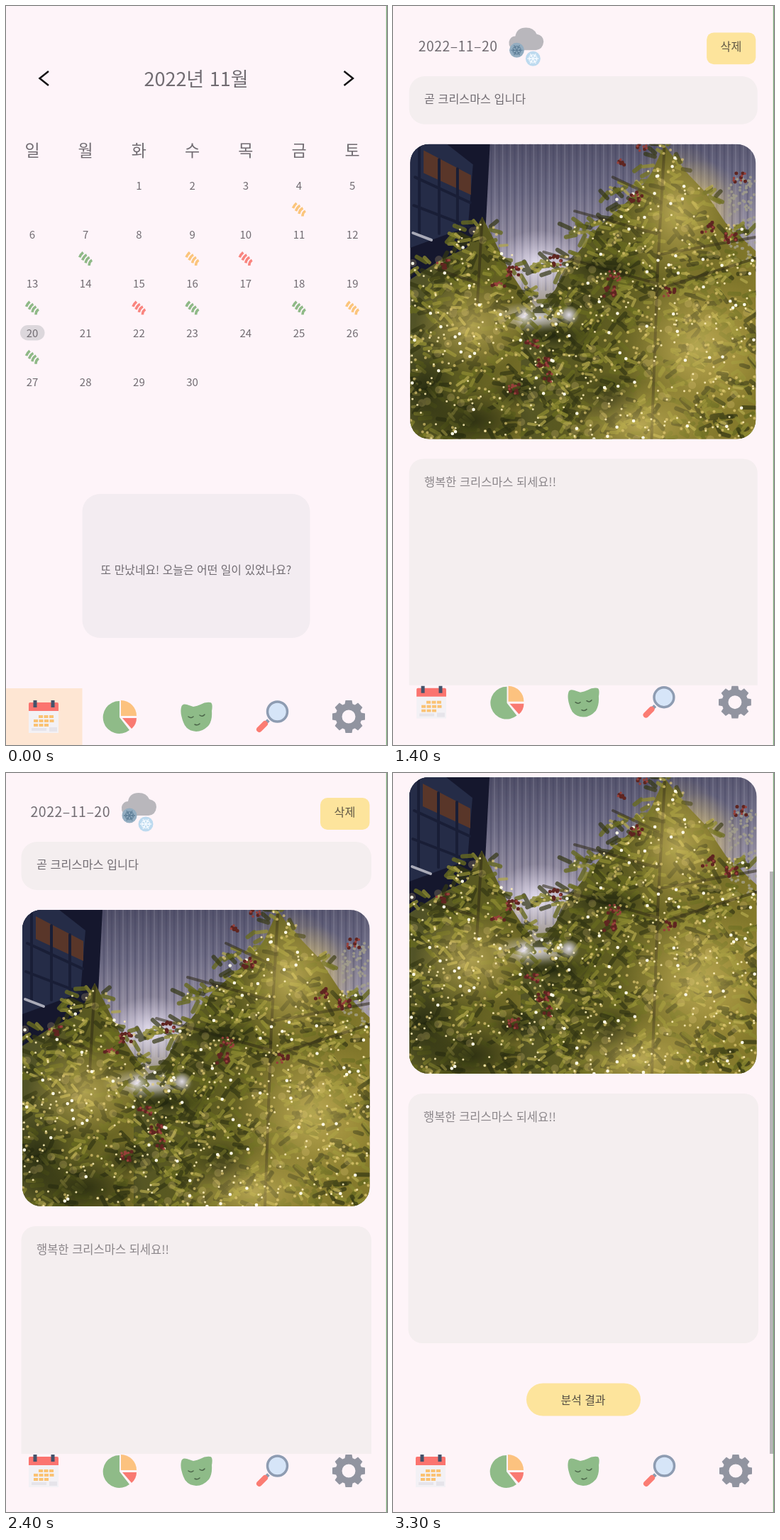
Animation, 537 px wide and 1042 px high, one loop 3.4 s. Source, as an HTML page:

```html
<!DOCTYPE html>
<html lang="ko">
<head>
<meta charset="utf-8">
<title>Diary</title>
<style>
  html, body { margin: 0; width: 100%; height: 100%; overflow: hidden; background: #fef4f9; }
  svg { display: block; width: 100%; height: 100%; }
  text { font-family: "Noto Sans CJK KR", "Noto Sans CJK", "Noto Sans CJK JP", sans-serif; fill: #716c72; }
</style>
</head>
<body>
<svg id="stage" viewBox="0 0 537 1042" xmlns="http://www.w3.org/2000/svg">
  <defs>
    <clipPath id="photoClip"><rect x="23" y="193" width="489.500" height="418" rx="27"/></clipPath>
    <linearGradient id="wall" x1="0" y1="0" x2=".1" y2="1">
      <stop offset="0" stop-color="#4b4a63"/><stop offset=".2" stop-color="#6c6a83"/>
      <stop offset=".42" stop-color="#a29aab"/><stop offset=".55" stop-color="#a59d94"/>
      <stop offset=".7" stop-color="#716b40"/>
    </linearGradient>
    <linearGradient id="leaf" x1="0" y1=".2" x2="1" y2=".5">
      <stop offset="0" stop-color="#4f5129"/><stop offset=".4" stop-color="#5b5a20"/>
      <stop offset="1" stop-color="#857a2c"/>
    </linearGradient>
    <radialGradient id="warm">
      <stop offset="0" stop-color="#f2d878" stop-opacity=".55"/><stop offset="1" stop-color="#e8c860" stop-opacity="0"/>
    </radialGradient>
    <radialGradient id="cool">
      <stop offset="0" stop-color="#f4efff" stop-opacity=".85"/><stop offset="1" stop-color="#d5cfe6" stop-opacity="0"/>
    </radialGradient>
    <radialGradient id="shade">
      <stop offset="0" stop-color="#1c210c" stop-opacity=".75"/><stop offset="1" stop-color="#1c210c" stop-opacity="0"/>
    </radialGradient>

    <g id="stamp" fill="none" stroke="currentColor" stroke-width="3.600">
      <path d="M-8.500 -2Q-7 -6 -3.500 -9M-4.500 2Q-2 -4 1.500 -5.500M0 6Q1 0 5.500 -2M5 9.500Q5 4 9 2"/>
    </g>

    <g id="icons">
      <g transform="translate(53)">
        <path fill="#f3f1f5" d="M-21-9H21V23H-21z"/>
        <path fill="#e6e4ea" d="M8 15h11v6H8zM-17 16h21v4h-21z"/>
        <path fill="#fb746f" d="M-21-8v-10q0-2 2-2h38q2 0 2 2v10z"/>
        <path stroke="#44536b" stroke-width="5" d="M-12-23v10M13-23v10"/>
        <path stroke="#fac273" stroke-width="4" stroke-dasharray="6 1.500" d="M-7 0H15M-14 6H15M-14 12H7"/>
      </g>
      <g transform="translate(161)">
        <path fill="#8fbb88" d="M-1 1V-22A23 23 0 1 0 13 19z"/>
        <path fill="#fcc27f" d="M1-1V-23A22 22 0 0 1 23-1z"/>
        <path fill="#f97a72" d="M3 2H23Q23 11 16 17z"/>
      </g>
      <g transform="translate(268)">
        <path fill="#8ebb88" d="M-21-13Q-20-19-13-17Q-7-15-4-14Q2-15 6-17Q13-21 20-20Q24-19 22-8Q23 4 18 12Q10 21 0 21Q-14 20-18 8Q-23-5-21-13z"/>
        <path fill="none" stroke="#4b6549" stroke-width="1.500" stroke-linecap="round" d="M-11 0q4 3 7 0M5-2q4 3 7-1M-2 11q4 2 7-1"/>
      </g>
      <g transform="translate(375)">
        <path stroke="#8e9bb0" stroke-width="5" d="M-5 5L-10 10"/>
        <path stroke="#fb7c73" stroke-width="8" stroke-linecap="round" d="M-10 10L-18 18"/>
        <circle cx="7.500" cy="-7" r="14" fill="#d6e5f8" stroke="#8e9cb2" stroke-width="3.500"/>
      </g>
      <g transform="translate(483)">
        <g id="teeth" fill="#9194a0"></g>
        <circle r="14" fill="none" stroke="#9194a0" stroke-width="9"/>
      </g>
    </g>
  </defs>

  <rect width="537" height="1042" fill="#fef4f9"/>

  <g id="calendar">
    <path fill="none" stroke="#151315" stroke-width="2.500" d="M60 92L47.500 102L60 112M476.500 92L489 102L476.500 112"/>
    <text x="268" y="113" font-size="27" text-anchor="middle">2022년 11월</text>
    <rect x="20" y="450" width="34.500" height="21.500" rx="10.700" fill="#dcd7dc"/>
    <g id="days" text-anchor="middle"></g>
    <rect x="107.500" y="688" width="321" height="203" rx="25" fill="#f3ecf1"/>
    <text x="268" y="801" font-size="15.900" text-anchor="middle">또 만났네요! 오늘은 어떤 일이 있었나요?</text>
    <rect y="962" width="107.500" height="80" fill="#fee6d3"/>
    <use href="#icons" y="1002"/>
  </g>
  <rect id="veil" width="537" height="1042" fill="#fef5f8"/>

  <g id="diary">
    <rect width="537" height="1042" fill="#fef4f8"/>
    <g id="page">
      <text x="34.500" y="62" font-size="19.500" letter-spacing=".5">2022–11–20</text>
      <path fill="#b9b7bc" d="M172 60Q162 58 163 48Q165 40 172 40Q174 28 187 28Q198 28 202 37Q212 39 212 48Q211 59 201 60z"/>
      <g id="flakes"></g>
      <rect x="443" y="35" width="69.500" height="45" rx="10" fill="#fde49c"/>
      <text x="477.500" y="61" font-size="16.300" text-anchor="middle" style="fill:#5f5745">삭제</text>
      <rect x="21.500" y="97" width="493.500" height="68" rx="22" fill="#f4eeef"/>
      <text x="43" y="135" font-size="16.300">곧 크리스마스 입니다</text>
      <g id="photo" clip-path="url(#photoClip)"></g>
      <rect x="21.500" y="639" width="493.500" height="352" rx="20" fill="#f4eeef"/>
      <text x="43" y="677.500" font-size="16.500" style="fill:#8b868a">행복한 크리스마스 되세요!!</text>
      <rect x="188" y="1047.500" width="161" height="46" rx="23" fill="#fde49c"/>
      <text x="268" y="1077" font-size="15.900" text-anchor="middle" style="fill:#544d42">분석 결과</text>
    </g>
    <rect y="960" width="537" height="82" fill="#fef4f8"/>
    <use href="#icons" y="984"/>
    <rect id="bar" x="531" width="5.500" height="821" fill="#b7b5b8"/>
  </g>
  <rect x="535.800" width="1.200" height="1042" fill="#79a878"/>
</svg>
<script>
const $ = id => document.getElementById(id);
const LOOP = 3400, STEP = 100;

$('teeth').innerHTML = Array.from({ length: 8 }, (_, i) =>
  `<path d="M-6-15L-4.500-23H4.500L6-15z" transform="rotate(${i * 45})"/>`).join('');

function buildDays() {
  const colors = { g: '#8fb987', y: '#fbc57c', r: '#f9857f' };
  const stamps = { 4: 'y', 7: 'g', 9: 'y', 10: 'r', 13: 'g', 15: 'r', 16: 'g', 18: 'g', 19: 'y', 20: 'g' };
  const colX = i => 37 + 75.2 * i;
  let out = [...'일월화수목금토'].map((d, i) =>
    `<text x="${colX(i)}" y="211.500" font-size="23">${d}</text>`).join('');
  for (let d = 1; d <= 30; d++) {
    const x = colX((d + 1) % 7), y = 253 + 69.4 * Math.floor((d + 1) / 7);
    out += `<text x="${x}" y="${y + 5.5}" font-size="15">${d}</text>`;
    if (stamps[d]) out += `<use href="#stamp" x="${x}" y="${y + 34}" color="${colors[stamps[d]]}"/>`;
  }
  $('days').innerHTML = out;
}

function flake(x, y, fill, line) {
  const arms = [0, 60, 120].map(a => `<path d="M-8 0H8M-6-2.500L-3.500 0L-6 2.500M6-2.500L3.500 0L6 2.500" transform="rotate(${a})"/>`);
  return `<g transform="translate(${x} ${y})"><circle r="10.500" fill="${fill}"/>` +
    `<g fill="none" stroke="${line}" stroke-width="1.300">${arms.join('')}</g></g>`;
}

// Night scene: building, ribbed wall and two lit fir trees.
function buildPhoto() {
  let seed = 20;
  const rnd = () => (seed = (seed * 16807) % 2147483647) / 2147483647;
  const span = (a, b) => a + rnd() * (b - a);
  const inFir = (x, y, cx, top, left, right) => {
    const dx = x - cx, reach = (y - top) * (0.85 + 0.25 * Math.sin(y / 8));
    return y > top && dx > -reach * left - 3 && dx < reach * right + 3;
  };
  const inTree = (x, y) =>
    inFir(x, y, 125, 292, 1.3, 0.85) || inFir(x, y, 383, 190, 1, 0.85) || y > 435;
  const spot = () => {
    let x, y;
    do { x = span(20, 515); y = span(190, 612); } while (!inTree(x, y));
    return [x, y];
  };
  const path = (d, color, width, extra = '') =>
    `<path d="${d}" fill="none" stroke="${color}" stroke-width="${width}" stroke-linecap="round" ${extra}/>`;
  const fill = (d, color) => `<path d="${d}" fill="${color}"/>`;
  const dots = (n, place) => {
    let d = '';
    for (let i = 0; i < n; i++) {
      const [x, y] = place();
      d += `M${x.toFixed(1)} ${y.toFixed(1)}h.1`;
    }
    return d;
  };
  const needles = (n, len) => {
    let d = '';
    for (let i = 0; i < n; i++) {
      const [x, y] = spot();
      const side = x < (y < 435 ? 200 : 235) ? Math.sign(x - 125) : Math.sign(x - 383);
      const a = span(-0.9, 1.2), l = span(len / 2, len);
      d += `M${x.toFixed(1)} ${y.toFixed(1)}l${(side * l * Math.cos(a)).toFixed(1)} ${(l * Math.sin(a)).toFixed(1)}`;
    }
    return d;
  };
  const glow = (kind, x, y, rx, ry = rx) =>
    `<ellipse cx="${x}" cy="${y}" rx="${rx}" ry="${ry}" fill="url(#${kind})"/>`;

  let out = '<rect x="23" y="193" width="490" height="418" fill="url(#wall)"/>';
  let ribs = '';
  for (let x = 138; x < 512; x += 11) ribs += `M${x} 193V400`;
  out += path(ribs, '#3f3f5c', 2.5, 'opacity=".35"') +
    path(ribs, '#c4c0d2', 1.5, 'opacity=".2" transform="translate(5)"');
  out += fill('M23 193H136L129 330L110 400H23z', '#15172d') +
    fill('M23 193H75L112 222L105 310L23 340z', '#252c47') +
    fill('M42 202L109 237V265L42 234z', '#593629') +
    path('M36 193V320M64 215V320M90 228V310M30 240L108 276M28 280L106 310', '#191e36', 4) +
    path('M27 319L53 329', '#aaabb8', 4);
  out += glow('cool', 205, 365, 65, 50) + glow('warm', 432, 285, 65, 70);

  out += fill('M125 296L103 340L65 358L23 385V612H250L262 455L215 440L185 405L162 370L140 325z', 'url(#leaf)') +
    fill('M383 194L362 240L330 275L290 310L250 360L228 400L180 450V612H513V345L470 305L440 260L402 220z', 'url(#leaf)');
  out += glow('cool', 200, 438, 65, 22);
  out += path(dots(110, () => [span(474, 512), span(240, 360)]), '#a5a28c', 4, 'opacity=".8"');
  for (let layer = 0; layer < 3; layer++) {
    out += path(needles(150, 18), '#343713', 6, 'opacity=".7"') +
      path(needles(130, 16), '#676a20', 6, 'opacity=".8"') +
      path(needles(120, 15), '#8a8830', 5, 'opacity=".8"') +
      path(needles(70, 12), '#b0a64b', 4, 'opacity=".75"');
  }
  out += path('M383 200L374 360L365 610M374 270L310 240M372 320L256 288M370 390L212 346M374 350L512 325' +
    'M370 400L512 355M125 300L118 420M118 390L60 370', '#2f2814', 4, 'opacity=".55"');
  out += glow('shade', 110, 585, 85, 45) + glow('shade', 175, 545, 45, 25) + glow('shade', 305, 555, 42, 38) +
    glow('shade', 230, 465, 60, 18) + glow('shade', 300, 370, 60, 22) + glow('shade', 45, 540, 45, 60);
  out += glow('warm', 400, 290, 75, 100) + glow('warm', 430, 480, 110) + glow('warm', 350, 590, 110, 60) +
    glow('warm', 110, 450, 80, 70);
  out += path(dots(110, spot), '#f7dc8a', 11, 'opacity=".2"') +
    path(dots(300, spot), '#e8cf78', 4, 'opacity=".65"') +
    path(dots(300, spot), '#fff0b8', 3, 'opacity=".85"') + path(dots(90, spot), '#fffbe6', 4.5);
  out += glow('cool', 185, 438, 14) + glow('cool', 248, 435, 14);

  const berries = [[70, 364], [148, 392], [168, 374], [228, 358], [325, 217], [343, 268], [312, 380], [306, 402],
    [390, 403], [445, 311], [476, 326], [490, 240], [196, 474], [212, 502], [222, 523], [170, 540], [352, 200]];
  const berry = () => {
    const [x, y] = berries[Math.floor(rnd() * berries.length)];
    return [x + span(-9, 9), y + span(-7, 7)];
  };
  out += path(dots(120, berry), '#5f2520', 5) + path(dots(75, berry), '#97403a', 3.5);
  $('photo').innerHTML = out;
}

// Linear interpolation through [time, value] pairs.
function track(t, keys) {
  if (t <= keys[0][0]) return keys[0][1];
  for (let i = 1; i < keys.length; i++) {
    const [t0, v0] = keys[i - 1], [t1, v1] = keys[i];
    if (t <= t1) return v0 + (v1 - v0) * (t - t0) / (t1 - t0);
  }
  return keys[keys.length - 1][1];
}

const zoom = s => `translate(268 521) scale(${s}) translate(-268 -521)`;

function draw(ms) {
  const t = Math.floor((ms % LOOP) / STEP) * STEP;
  $('calendar').setAttribute('transform', zoom(track(t, [[1000, 1], [1100, 1.015], [1200, 1.05], [1300, 1.08]])));
  $('veil').setAttribute('opacity', track(t, [[1000, 0], [1100, 0.15], [1200, 0.55], [1300, 1]]));
  $('diary').setAttribute('opacity', track(t, [[1200, 0], [1300, 0.75], [1400, 1]]));
  $('diary').setAttribute('transform', zoom(track(t, [[1200, 0.94], [1300, 0.975], [1400, 0.995], [1500, 1]])));
  const scroll = track(t, [[2700, 0], [2800, 7], [2900, 28], [3000, 64], [3100, 118], [3200, 168], [3300, 187]]);
  $('page').setAttribute('transform', `translate(0 ${-scroll})`);
  $('bar').setAttribute('y', scroll * 0.743);
  $('bar').setAttribute('opacity', scroll > 0 ? 1 : 0);
}

buildDays();
buildPhoto();
$('flakes').innerHTML = flake(174, 60, '#93adc1', '#5f7f98') + flake(197, 72, '#bddaef', '#f4faff');

const start = performance.now();
function tick() {
  draw(performance.now() - start);
  requestAnimationFrame(tick);
}
draw(0);
requestAnimationFrame(tick);
</script>
</body>
</html>
```
